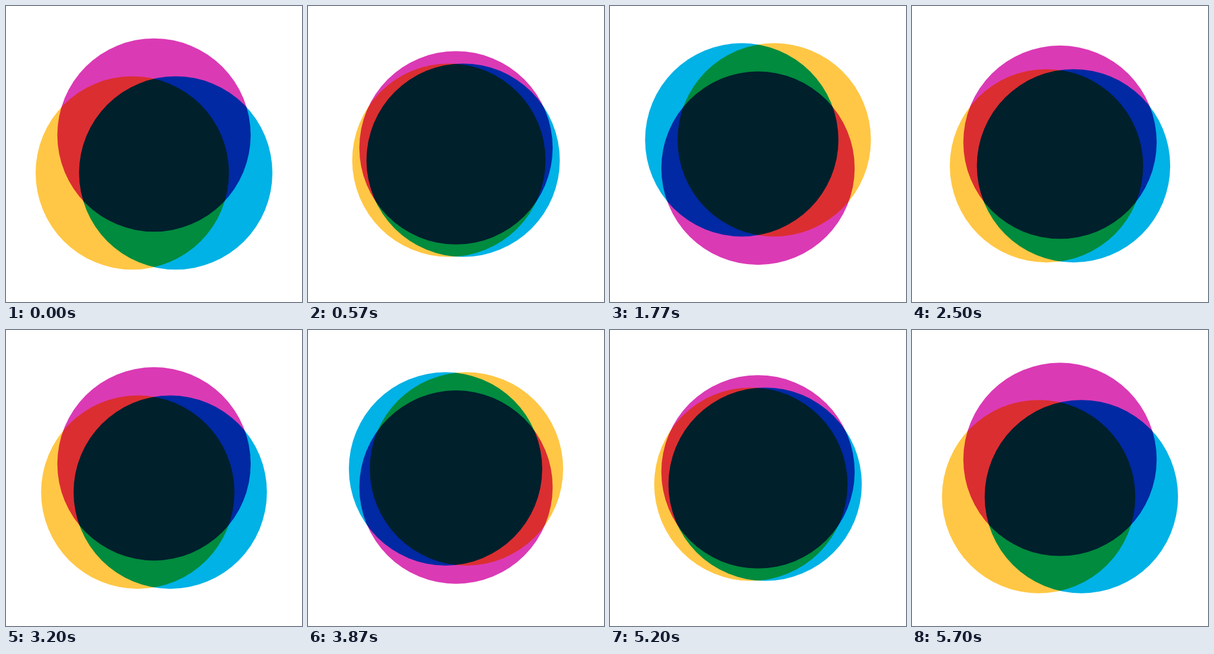
An HTML page with a canvas that plays this animation: 500x500 px, repeating every 5.73 s.

```html
<!DOCTYPE html>
<html lang="en">
<head>
<meta charset="utf-8">
<title>Overlapping discs</title>
<style>
  html, body { margin: 0; width: 100%; height: 100%; overflow: hidden; background: #fff; }
  canvas { display: block; width: 500px; height: 500px; }
</style>
</head>
<body>
<canvas id="stage" width="500" height="500"></canvas>
<script>
const ctx = document.getElementById('stage').getContext('2d');
const LOOP = 5730;
const CENTER = 250;
const RADIUS = 163.3;
const REACH_X = 36.7;
const REACH_Y = 32;
const HALF_SWING = 18; // poses from one extreme to the other

const discs = [
  { color: '#ffc745', x: -1, y: 1 },
  { color: '#00b2e6', x: 1, y: 1 },
  { color: '#db3ab5', x: 0, y: -1 }
];

const smooth = p => p * p * (3 - 2 * p);

// 12.5 poses per second, shown on a 30 Hz clock rounded to 10 ms
function poseAt(ms) {
  const tick = Math.floor((ms % LOOP + 3.5) * 0.03);
  return Math.floor(tick * 5 / 12);
}

// Swings from 1 to -1 and back
function spreadAt(pose) {
  const phase = pose % (2 * HALF_SWING);
  const progress = 1 - Math.abs(phase / HALF_SWING - 1);
  return 1 - 2 * smooth(progress);
}

function draw(ms) {
  const spread = spreadAt(poseAt(ms));
  ctx.globalCompositeOperation = 'source-over';
  ctx.fillStyle = '#fff';
  ctx.fillRect(0, 0, 500, 500);
  ctx.globalCompositeOperation = 'multiply';
  for (const { color, x, y } of discs) {
    ctx.fillStyle = color;
    ctx.beginPath();
    ctx.arc(CENTER + x * REACH_X * spread, CENTER + y * REACH_Y * spread, RADIUS, 0, 2 * Math.PI);
    ctx.fill();
  }
}

const start = performance.now();
function loop() {
  draw(performance.now() - start);
  requestAnimationFrame(loop);
}
loop();
</script>
</body>
</html>
```
